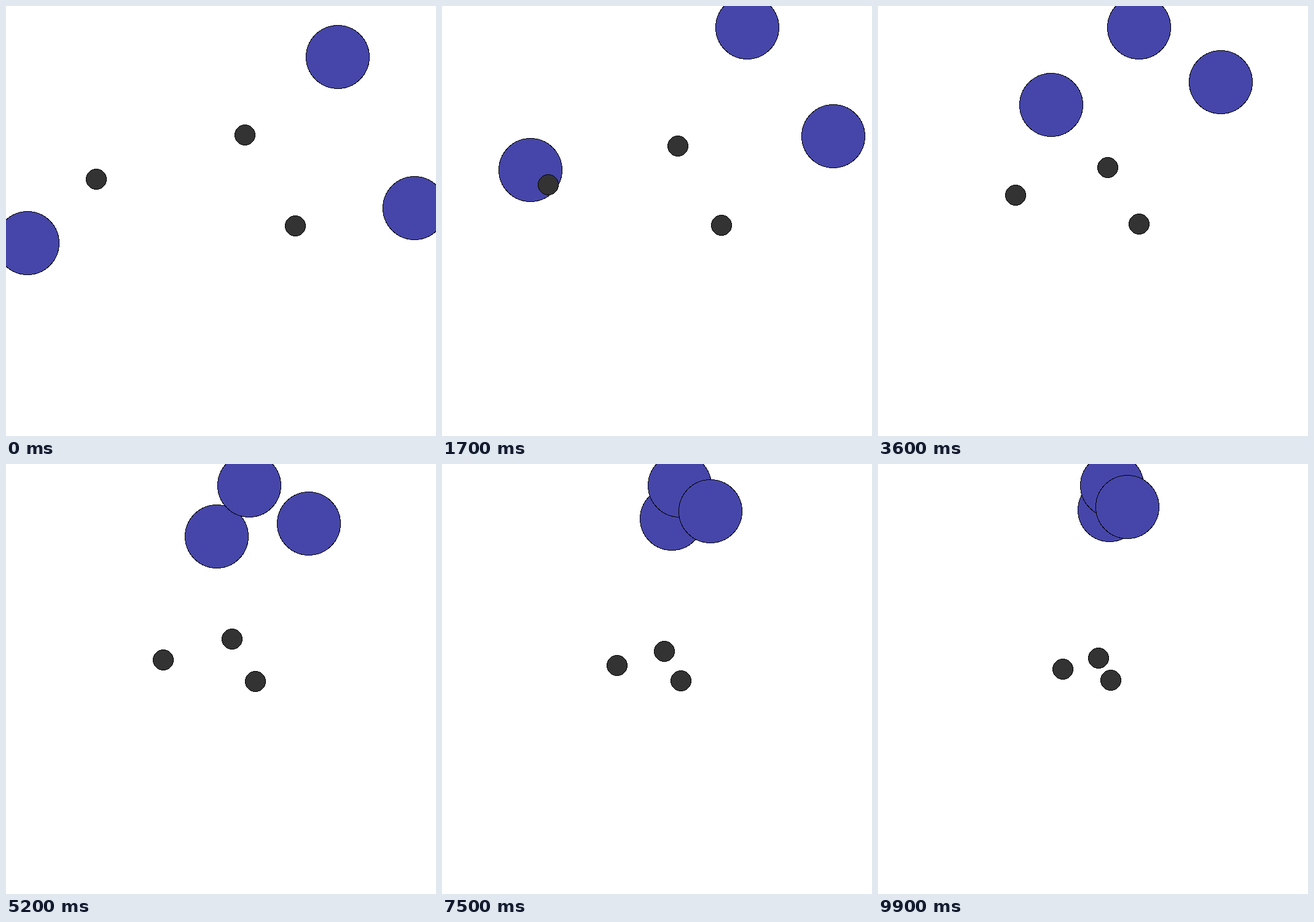
Write an HTML page that moves like this. It is 700x700 px and loops after 10 s.

```html
<!DOCTYPE html>
<html lang="en">
<head>
<meta charset="utf-8">
<title>Gathering circles</title>
<style>
  html, body { margin: 0; width: 100%; height: 100%; overflow: hidden; background: #fff; }
  svg { display: block; width: 700px; height: 700px; shape-rendering: crispEdges; }
  circle { stroke: #000; stroke-width: 1; }
  .big { fill: #4646aa; }
  .small { fill: #333; }
</style>
</head>
<body>
<svg viewBox="0 0 700 700">
  <circle class="big" r="51.5"/>
  <circle class="big" r="51.5"/>
  <circle class="big" r="51.5"/>
  <circle class="small" r="16.5"/>
  <circle class="small" r="16.5"/>
  <circle class="small" r="16.5"/>
</svg>
<script>
const LOOP = 10000, STEP = 100, MID = 350, EDGE = 35;
const times = [0, 1.7, 3.6, 5.2, 6.5, 8.6, 9.9];

// Smooth cubic curve through values placed at the shared times
function curve(values) {
  const last = times.length - 1;
  const span = i => times[i + 1] - times[i];
  const slope = i => (values[i + 1] - values[i]) / span(i);
  const tangents = values.map((_, i) => i > 0 && i < last
    ? (slope(i - 1) * span(i) + slope(i) * span(i - 1)) / (span(i - 1) + span(i))
    : 0);
  tangents[0] = 2 * slope(0) - tangents[1];
  tangents[last] = 2 * slope(last - 1) - tangents[last - 1];

  return t => {
    let i = 0;
    while (i < last - 1 && t > times[i + 1]) i++;
    const h = span(i), u = (t - times[i]) / h, v = 1 - u;
    return values[i] * v * v * (1 + 2 * u) + values[i + 1] * u * u * (3 - 2 * u)
      + h * u * v * (tangents[i] * v - tangents[i + 1] * u);
  };
}

// Paths may run outside the walls; positions are clamped when drawn
const bigPaths = [
  [[-24, 144, 282, 343, 366, 377, 377], [386, 267, 161, 118, 99, 81, 75]],
  [[540, 497, 425, 396, 390, 385, 381], [83, -30, -100, -130, -140, -150, -155]],
  [[706, 637, 558, 493, 457, 421, 406], [329, 212, 124, 97, 83, 73, 70]]
].map(path => path.map(curve));

const smallOffsets = [[-203, -68], [39, -140], [121, 8]];
const spread = curve([1, 0.87, 0.62, 0.461, 0.373, 0.276, 0.24]);

const circles = document.querySelectorAll("circle");
const clamp = n => Math.min(700 - EDGE, Math.max(EDGE, n));

function place(circle, x, y) {
  circle.setAttribute("cx", Math.round(x));
  circle.setAttribute("cy", Math.round(y));
}

function draw(ms) {
  const t = Math.floor(ms % LOOP / STEP) * STEP / 1000;
  const s = spread(t);
  bigPaths.forEach(([x, y], i) => place(circles[i], clamp(x(t)), clamp(y(t))));
  smallOffsets.forEach(([x, y], i) => place(circles[i + 3], MID + x * s, MID + y * s));
}

let start;
function tick(now) {
  start ??= now;
  draw(now - start);
  requestAnimationFrame(tick);
}
draw(0);
requestAnimationFrame(tick);
</script>
</body>
</html>
```
